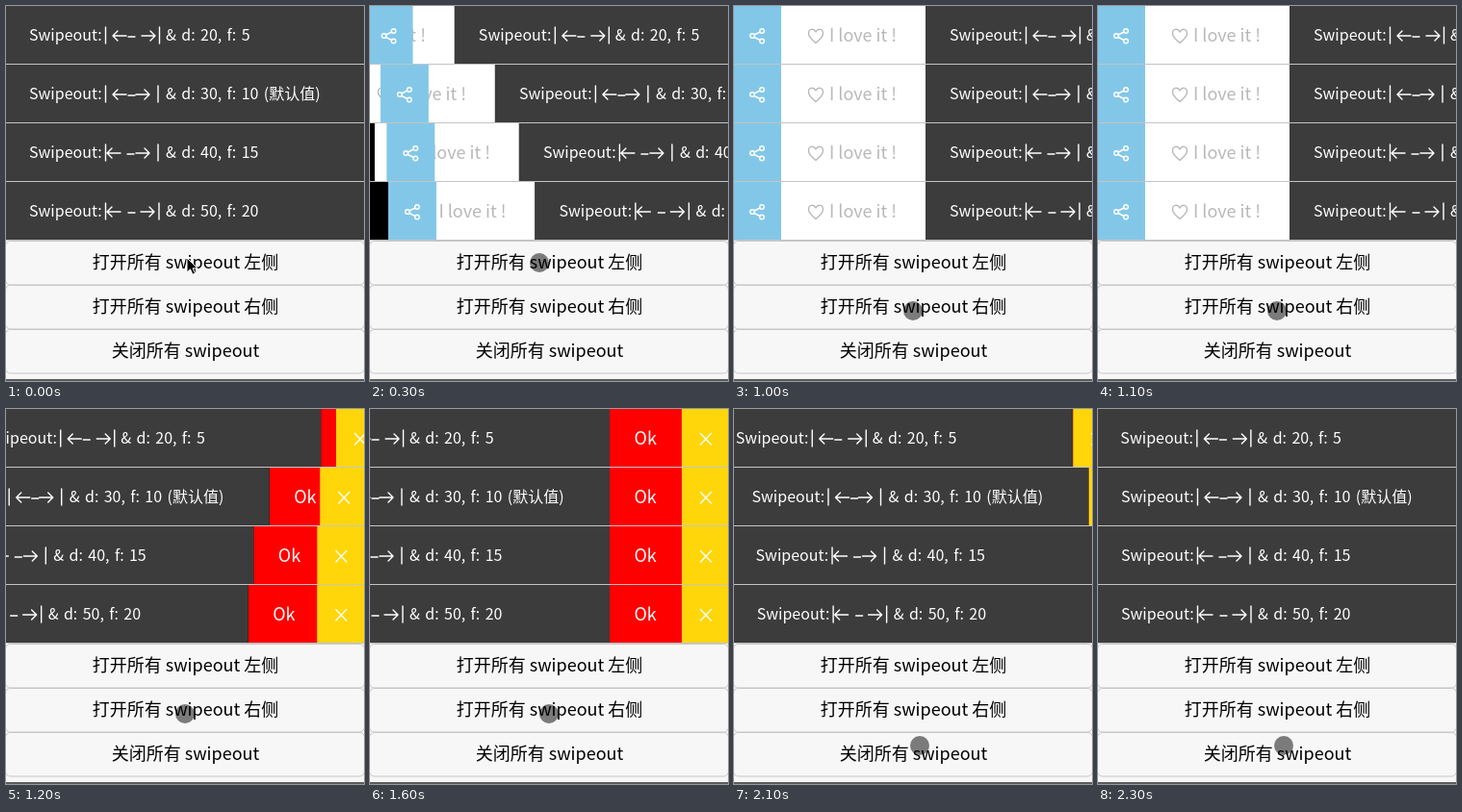
Write an HTML page that moves like this. It is 372 px wide and 390 px high and loops after 2400 ms.

```html
<!DOCTYPE html>
<html lang="zh-CN">
<meta charset="utf-8">
<title>Swipeout</title>
<style>
html, body { margin: 0; width: 100%; height: 100%; overflow: hidden; background: #f7f7f7 }
#stage { display: block }
text { font: 16px "Noto Sans CJK SC", "Noto Sans CJK", sans-serif; white-space: pre }
.tail { word-spacing: 1.8px }
.big { font-size: 18px }
.line { fill: none; stroke: #fff; stroke-width: 1.4; stroke-linecap: round; stroke-linejoin: round }
</style>
<svg id="stage" width="372" height="390" viewBox="0 0 372 390"></svg>
<script>
const LEFT = 200, RIGHT = 125, WIDTH = 375, LOOP = 2400;
const stage = document.getElementById('stage');

// x positions: left arrow, dash, right arrow, closing bar; rate: approach speed per ms
const rows = [
  { marks: [112, 128, 142, 160.5], tail: '& d: 20, f: 5', rate: .0178 },
  { marks: [112, 128, 136, 159], tail: '& d: 30, f: 10 (默认值)', rate: .0322 },
  { marks: [106, 127, 136, 159], tail: '& d: 40, f: 15', rate: .0458 },
  { marks: [106, 128, 141, 160], tail: '& d: 50, f: 20', rate: .060 }
];

const marksPath = ([a, dash, b, bar]) =>
  `M104.5 22V39M${bar} 22V39M${dash} 32h7` +
  `M${a + 14} 31H${a}m5-5l-5 5l5 5M${b} 31h14m-5-5l5 5l-5 5`;

const rowMarkup = (row, i) => `
<svg y="${61 * i}" width="372" height="60">
  <rect width="372" height="60"/>
  <g class="love">
    <rect width="150" height="60" fill="#fff"/>
    <path class="line" style="stroke:#b8b8b8" d="M36 38.5C31 34.5 28.500 32 28.500 28.500
      C28.500 23.500 34 23 36 27C38 23 43.500 23.500 43.500 28.500C43.500 32 41 34.500 36 38.500Z"/>
    <text class="big" x="50" y="36.500" fill="#b8b8b8">I love it !</text>
  </g>
  <g class="share">
    <rect width="50" height="60" fill="#83c7e8"/>
    <path class="line" d="M22 30l6-3M22 32.500l6 3"/>
    <g class="line"><circle cx="20" cy="31" r="2.300"/><circle cx="30" cy="26" r="2.300"/><circle cx="30" cy="36.500" r="2.300"/></g>
  </g>
  <g class="ok">
    <rect width="75" height="60" fill="#fe0000"/>
    <text class="big" x="25.500" y="36.500" fill="#fff">Ok</text>
  </g>
  <g class="close">
    <rect width="50" height="60" fill="#ffd60a"/>
    <path class="line" d="M19.500 25.500l11 11.500m0-11.500l-11 11.500"/>
  </g>
  <g class="body">
    <rect width="${WIDTH}" height="60" fill="#3c3c3c"/>
    <g fill="#fff">
      <text x="25" y="36">Swipeout:</text>
      <path class="line" d="${marksPath(row.marks)}"/>
      <text class="tail" x="167" y="36">${row.tail}</text>
    </g>
  </g>
</svg>
<rect y="${61 * i + 60}" width="372" height="1" fill="#c4c4c4"/>`;

const buttonMarkup = (label, i) => `
<rect x="-.5" y="${244.5 + 46 * i}" width="373" height="45.500" rx="5" fill="#f7f7f7" stroke="#c6c6c6"/>
<text class="big" x="186.500" y="${273 + 46 * i}" text-anchor="middle">${label}</text>`;

stage.innerHTML = `
<rect y="243" width="372" height="147" fill="#f7f7f7"/>` +
  ['打开所有 swipeout 左侧', '打开所有 swipeout 右侧', '关闭所有 swipeout'].map(buttonMarkup).join('') +
  rows.map(rowMarkup).join('') + `
<rect y="388" width="372" height="2" fill="#5c5c5c"/>
<circle id="touch" r="10" fill="#000" fill-opacity=".5"/>
<path id="pointer" d="M0 0V15l3.500-3.200l2.400 5.400l2.600-1.100l-2.400-5.300h4.900Z" stroke="#fff"/>`;

for (const [i, svg] of [...stage.querySelectorAll('svg')].entries())
  for (const name of ['love', 'share', 'ok', 'close', 'body'])
    rows[i][name] = svg.querySelector('.' + name);

const move = (el, x, y = 0) => el.setAttribute('transform', `translate(${x} ${y})`);

// Each tap starts an exponential approach to a new offset.
const taps = [[267, 0, LEFT], [1120, LEFT, -RIGHT], [2003, -RIGHT, 0]];
function offsetAt(t, rate) {
  const tap = taps.findLast(([start]) => t >= start);
  if (!tap) return 0;
  const [start, from, to] = tap;
  return to + (from - to) * Math.exp(-rate * (t - start));
}

// The outer button trails the inner one while a side opens.
const gap = (part, width, power, lag) =>
  width * (1 - Math.min(1, lag * (1 - Math.min(1, part)) ** power));

const path = [
  [0, 188, 262], [100, 182, 263], [200, 176, 267], [600, 176, 267], [700, 180, 290],
  [800, 185, 341], [900, 186, 325], [1000, 186, 317], [1600, 186, 317],
  [1700, 190, 335], [1800, 193, 350], [LOOP, 193, 350]
];
function cursorAt(t) {
  const n = path.findIndex(p => p[0] > t);
  const [t0, x0, y0] = path[n - 1], [t1, x1, y1] = path[n];
  const k = (t - t0) / (t1 - t0);
  return [x0 + (x1 - x0) * k, y0 + (y1 - y0) * k];
}

function draw(now) {
  const t = Math.floor(now % LOOP / 100) * 100;
  for (const row of rows) {
    const offset = offsetAt(t, row.rate), x = offset - 1;
    const left = Math.max(0, offset), right = Math.max(0, -offset);
    move(row.body, x);
    move(row.love, x - 150);
    move(row.share, x - gap(left / LEFT, 150, .58, 1) - 50);
    move(row.ok, x + WIDTH);
    move(row.close, x + WIDTH + gap(right / RIGHT, 75, .84, 1.17));
  }
  const arrow = t < 200;
  touch.style.display = arrow ? 'none' : '';
  pointer.style.display = arrow ? '' : 'none';
  move(arrow ? pointer : touch, ...cursorAt(t));
  requestAnimationFrame(draw);
}

const touch = document.getElementById('touch'), pointer = document.getElementById('pointer');
const begin = performance.now();
draw(0);
function loop() { }
</script>
</html>
```
